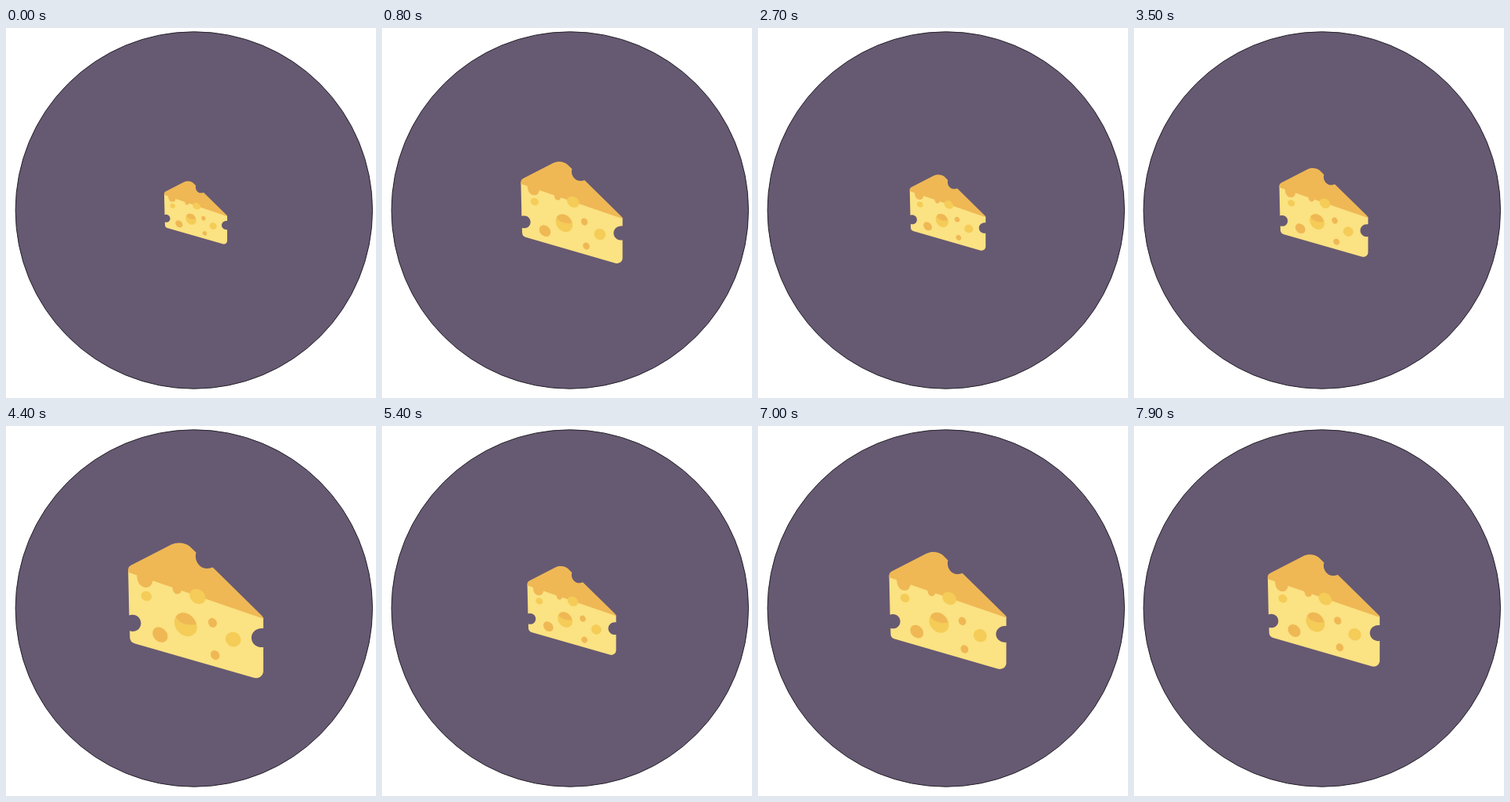
Recreate the animation shown at these times as an HTML page. Size 470 by 470 pixels, loop 8 s.

```html
<!DOCTYPE html>
<html lang="en">
<head>
<meta charset="utf-8">
<title>Cheese</title>
<style>
  html, body { margin: 0; width: 100%; height: 100%; overflow: hidden; background: #fff; }
  svg { display: block; width: 470px; height: 470px; }
  .disc { fill: #665972; stroke: #25222a; stroke-width: 1; }
  .light { fill: #fbe282; }
  .gold { fill: #f4cc57; }
  .orange { fill: #efb855; }
</style>
</head>
<body>
<svg viewBox="0 0 470 470">
  <circle class="disc" cx="238.8" cy="231.5" r="226.7"/>
  <g id="cheese">
    <!-- front face -->
    <path class="light" d="M167 190 L168.1 239.6 C175 237.4 181 242 181 248.2 C181 254.8 175 258.6 168.7 256.8
      L168.9 264 Q169.2 269 174 270.4 L304.5 308 C310 309.6 315 306 315 300.5 V274.6
      C308 275.4 302 270.8 302 264.2 C302 257.8 308 253 315 254 V242 L240 210 Z"/>
    <!-- top face -->
    <path class="orange" d="M167 192.6 V189.5 Q167 186.6 170 185 L214 162.4 C221.5 158.8 229.5 160.3 234.5 164.2
      L241.4 171 C239 178.6 244.5 188.8 254 188.4 Q257 188.2 259.6 187.2 L311.5 238.2 Q315 241.2 315 243.4 Z"/>
    <path class="orange" d="M176.6 195 C176.4 203.5 180.5 209.2 187 209.2 Q192.6 209.2 194.3 201 Z
      M215.3 208 Q216 216.4 220.8 216.4 Q225 216.4 225.6 211 Z"/>
    <!-- holes -->
    <ellipse class="gold" cx="243" cy="219" rx="9.4" ry="7.5" transform="rotate(35 243 219)"/>
    <ellipse class="gold" cx="187" cy="218.6" rx="6" ry="5.2" transform="rotate(30 187 218.6)"/>
    <ellipse class="gold" cx="282" cy="266" rx="8.6" ry="7.9" transform="rotate(30 282 266)"/>
    <ellipse class="gold" cx="230" cy="249.8" rx="13.9" ry="11.2" transform="rotate(50 230 249.8)"/>
    <path class="orange" d="M219.2 241.6 C222 235.2 231 235.6 236.4 240.8 Q240.5 244.8 241.4 249.4 C234 251.6 222.5 248.6 219.2 241.6 Z"/>
    <ellipse class="orange" cx="202" cy="261" rx="9.3" ry="7.3" transform="rotate(45 202 261)"/>
    <ellipse class="orange" cx="259.4" cy="247.8" rx="5.4" ry="4.6" transform="rotate(60 259.4 247.8)"/>
    <ellipse class="orange" cx="262.2" cy="283.2" rx="5.4" ry="4.7" transform="rotate(55 262.2 283.2)"/>
  </g>
</svg>
<script>
  const LOOP = 8000, STEP = 100;
  const HALF = 1475, PEAK = 1500;      // triangle wave, in ms
  const MIN = 78.4, MAX = 175, DRAWN = 148;
  const CX = 240.9, CY = 234.6;
  const cheese = document.getElementById('cheese');

  function widthAt(ms) {
    const phase = (ms - PEAK + 2 * HALF) % (2 * HALF);
    const fromPeak = Math.min(phase, 2 * HALF - phase);
    return MAX - (MAX - MIN) * fromPeak / HALF;
  }

  function draw() {
    const t = performance.now() % LOOP;
    const scale = widthAt(Math.floor(t / STEP) * STEP) / DRAWN;
    cheese.setAttribute('transform',
      `translate(${CX} ${CY}) scale(${scale}) translate(${-CX} ${-CY})`);
    requestAnimationFrame(draw);
  }
  draw();
</script>
</body>
</html>
```
